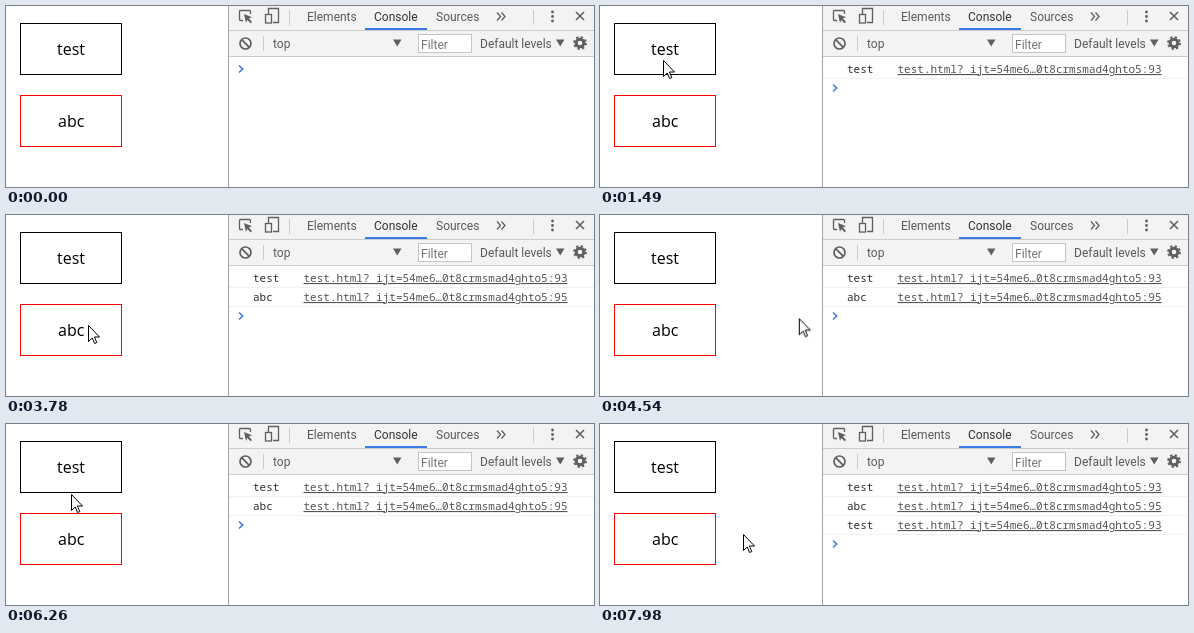
An HTML page that plays this animation: 588x181 px, repeating every 8 s.

```html
<!DOCTYPE html>
<html lang="en">
<head>
<meta charset="utf-8">
<title>Click logging</title>
<style>
html, body { margin: 0; width: 100%; height: 100%; overflow: hidden; background: #fff; }
svg { display: block; width: 588px; height: 181px; }
text { white-space: pre; }
.page { font: 16px "Open Sans", sans-serif; }
.ui { font: 12px Roboto, sans-serif; fill: #5a5a5a; }
.log { font: 11px "Noto Sans Mono", monospace; fill: #303030; }
.link { fill: #545454; text-decoration: underline; }
.crisp { shape-rendering: crispEdges; }
.icon { fill: none; stroke: #5f5f5f; stroke-width: 1.3; }

.row, .prompt, .cursor, .arrow, .beam { animation: 8s step-end infinite; }
.row1 { animation-name: row1; }
.row2 { animation-name: row2; }
.row3 { animation-name: row3; }
.prompt { animation-name: prompt; }
.cursor { animation-name: move; }
.arrow { animation-name: arrow; }
.beam { animation-name: beam; }

@keyframes row1 { 0% { opacity: 0 } 18.625%, 100% { opacity: 1 } }
@keyframes row2 { 0% { opacity: 0 } 47.25%, 100% { opacity: 1 } }
@keyframes row3 { 0% { opacity: 0 } 86.375%, 100% { opacity: 1 } }
@keyframes prompt {
  0% { transform: none }
  18.625% { transform: translateY(19px) }
  47.25% { transform: translateY(38px) }
  86.375%, 100% { transform: translateY(57px) }
}

/* The pointer becomes a text beam over the console. */
@keyframes arrow {
  0% { opacity: 0 }
  5.875% { opacity: 1 }
  30.375% { opacity: 0 }
  34.25% { opacity: 1 }
  58.3% { opacity: 0 }
  61.625% { opacity: 1 }
  93.375% { opacity: 0 }
  98%, 100% { opacity: 1 }
}
@keyframes beam {
  0% { opacity: 0 }
  30.375% { opacity: 1 }
  34.25% { opacity: 0 }
  58.3% { opacity: 1 }
  61.625% { opacity: 0 }
  93.375% { opacity: 1 }
  98%, 100% { opacity: 0 }
}

/* Each sampled move jumps at its first and its last moment. */
@keyframes move {
  0% { transform: translate(79px, 178px) }
  5.875% { transform: translate(79px, 178px); animation-timing-function: steps(4, jump-both) }
  8.4% { transform: translate(71px, 92px); animation-timing-function: steps(5) }
  11.625% { transform: translate(63px, 54px) }
  24.125% { transform: translate(63px, 54px); animation-timing-function: steps(4, jump-both) }
  27.5% { transform: translate(150px, 82px); animation-timing-function: steps(5) }
  31.25% { transform: translate(262px, 80px) }
  32% { transform: translate(262px, 80px); animation-timing-function: steps(2, jump-both) }
  33.5% { transform: translate(245px, 86px) }
  34.25% { transform: translate(245px, 86px); animation-timing-function: steps(3, jump-both) }
  36.25% { transform: translate(130px, 104px); animation-timing-function: steps(4) }
  38.625% { transform: translate(82px, 110px) }
  52.25% { transform: translate(82px, 110px); animation-timing-function: steps(4, jump-both) }
  55.625% { transform: translate(185px, 104px); animation-timing-function: steps(5) }
  59% { transform: translate(254px, 100px) }
  61.625% { transform: translate(254px, 100px); animation-timing-function: steps(2, jump-both) }
  63.875% { transform: translate(99px, 92px) }
  67.75% { transform: translate(96px, 93px) }
  68.5% { transform: translate(96px, 93px); animation-timing-function: steps(7, jump-both) }
  74% { transform: translate(77px, 109px) }
  76.625% { transform: translate(72px, 102px); animation-timing-function: steps(2, jump-both) }
  78.25% { transform: translate(65px, 70px) }
  78.875% { transform: translate(65px, 70px); animation-timing-function: steps(4, jump-both) }
  81.75% { transform: translate(62px, 54px) }
  89.5% { transform: translate(62px, 54px); animation-timing-function: steps(3, jump-both) }
  91.75% { transform: translate(190px, 84px); animation-timing-function: steps(5) }
  94.5% { transform: translate(269px, 107px) }
  98% { transform: translate(269px, 107px); animation-timing-function: steps(3, jump-both) }
  99.75%, 100% { transform: translate(143px, 110px) }
}
</style>
</head>
<body>
<svg viewBox="0 0 588 181">
  <g class="page">
    <g class="crisp" fill="none">
      <rect x="14.5" y="17.5" width="101" height="51" stroke="#000"/>
      <rect x="14.5" y="89.5" width="101" height="51" stroke="#f00"/>
    </g>
    <text x="51" y="49">test</text>
    <text x="52" y="121">abc</text>
  </g>

  <g class="crisp">
    <rect x="223" width="365" height="51" fill="#f3f3f3"/>
    <path d="M223 24.5H588M223 50.5H588" stroke="#ccc"/>
    <path d="M222.5 0V181" stroke="#a3a3a3"/>
    <path d="M283.5 4V19M527.5 4V19M257.5 30V45" stroke="#ccc"/>
    <rect x="359" y="22" width="62" height="2" fill="#3b79e6"/>
    <rect x="412.5" y="28.5" width="53" height="18" fill="#fff" stroke="#c4c4c4"/>
  </g>

  <g class="icon">
    <path d="M237 14.5H234.5Q233.5 14.5 233.5 13.5V5.5Q233.5 4.5 234.5 4.5H243.5Q244.5 4.5 244.5 5.5V8"/>
    <path d="M238 8L246 11.3 242.8 12.6 246 16 244.6 17.3 241.3 14 240 17Z" fill="#5f5f5f" stroke="none"/>
    <path d="M262.5 8V2.5H272.5V16.5H267"/>
    <rect x="259.5" y="8.5" width="6" height="8.5"/>
    <path d="M491 6.5L494.5 10.5 491 14.5M495.5 6.5L499 10.5 495.5 14.5"/>
    <path d="M570 6L578 14M578 6L570 14" stroke-width="1.6"/>
    <circle cx="239.5" cy="37.5" r="5.5" stroke-width="1.7"/>
    <path d="M235.7 33.7L243.3 41.3" stroke-width="1.7"/>
    <circle cx="574" cy="37" r="3.8" stroke-width="3"/>
    <circle cx="574" cy="37" r="5.9" stroke-width="2" stroke-dasharray="2.3 2.334"/>
  </g>
  <g fill="#5f5f5f">
    <circle cx="546.5" cy="6" r="1.4"/>
    <circle cx="546.5" cy="10.5" r="1.4"/>
    <circle cx="546.5" cy="15" r="1.4"/>
    <path d="M387 33.5H395.5L391.25 40.5ZM550 33.5H558.5L554.25 40.5Z"/>
  </g>

  <g class="ui">
    <text x="301" y="15">Elements</text>
    <text x="368" y="15" fill="#333">Console</text>
    <text x="430" y="15">Sources</text>
    <text x="267" y="42">top</text>
    <text x="415" y="43" fill="#757575">Filter</text>
    <text x="474" y="42">Default levels</text>
  </g>

  <g class="log">
    <g class="row row1">
      <path class="crisp" d="M223 72.5H588" stroke="#f0f0f0"/>
      <text x="247" y="67">test</text>
      <text class="link" x="297.5" y="67">test.html?_ijt=54me6…0t8crmsmad4ghto5:93</text>
    </g>
    <g class="row row2">
      <path class="crisp" d="M223 91.5H588" stroke="#f0f0f0"/>
      <text x="247" y="86">abc</text>
      <text class="link" x="297.5" y="86">test.html?_ijt=54me6…0t8crmsmad4ghto5:95</text>
    </g>
    <g class="row row3">
      <path class="crisp" d="M223 110.5H588" stroke="#f0f0f0"/>
      <text x="247" y="105">test</text>
      <text class="link" x="297.5" y="105">test.html?_ijt=54me6…0t8crmsmad4ghto5:93</text>
    </g>
  </g>
  <path class="prompt" d="M233 59.5L236.7 63 233 66.5" fill="none" stroke="#3b79e6" stroke-width="1.6"/>

  <g class="cursor">
    <path class="arrow" d="M.5 .5V16.5L4.2 13 6.6 18.5 8.8 17.6 6.4 12H11.5Z" fill="#fff" stroke="#000"/>
    <path class="beam" d="M-3 -7.5H0M1 -7.5H4M.5 -7V7M-3 7.5H0M1 7.5H4" fill="none" stroke="#000"/>
  </g>
</svg>
</body>
</html>
```
